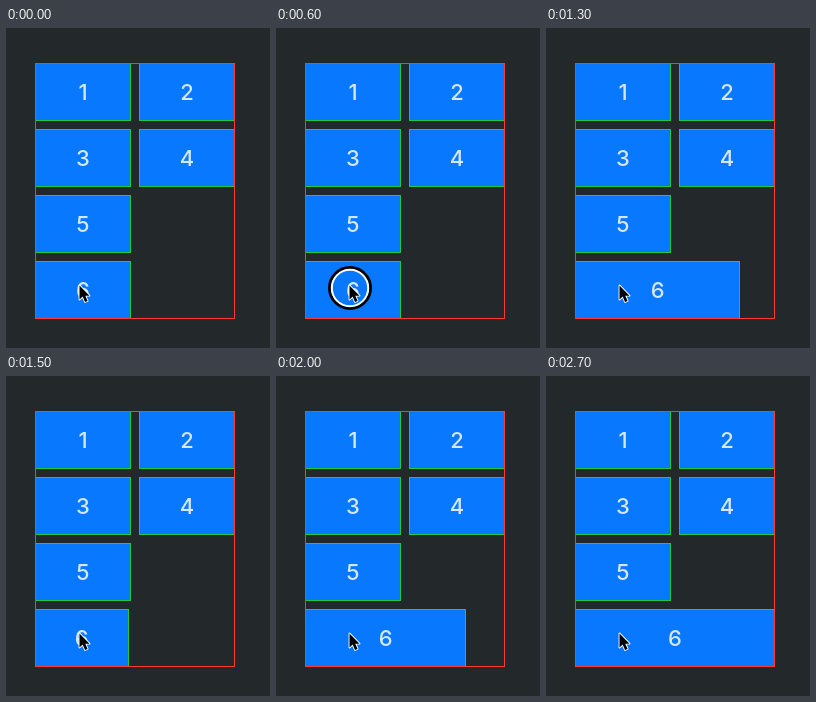
Animation, 264 px wide and 320 px high, one loop 2750 ms. Source, as an HTML page with a canvas:

```html
<!DOCTYPE html>
<html lang="en">
<head>
<meta charset="utf-8">
<title>Grid cell spring</title>
<style>
  html, body { margin: 0; width: 100%; height: 100%; overflow: hidden; background: #23282b; }
  canvas { display: block; }
</style>
</head>
<body>
<canvas id="stage" width="264" height="320"></canvas>
<script>
const ctx = document.getElementById('stage').getContext('2d');
const LOOP = 2750, STEP = 50;
const LEFT = 29, TOP = 35, CELL_W = 96, CELL_H = 58, GAP = 8, FULL_W = 200, FULL_H = 256;
const toggles = [630, 1216, 1862];
const pointer = { x: 73, y: 257 };

// Underdamped spring response from 0 to 1, time in ms
function spring(ms) {
  if (ms <= 0) return 0;
  const t = ms / 1000, damping = 0.7, omega = 2 * Math.PI / 0.5;
  const root = Math.sqrt(1 - damping * damping), phase = omega * root * t;
  return 1 - Math.exp(-damping * omega * t) * (Math.cos(phase) + damping / root * Math.sin(phase));
}

function lastCellWidth(t) {
  const progress = toggles.reduce((sum, at, i) => sum + (i % 2 ? -1 : 1) * spring(t - at), 0);
  return CELL_W + (FULL_W - CELL_W) * progress;
}

function outline(x, y, w, h, color) {
  ctx.strokeStyle = color;
  ctx.lineWidth = 1;
  ctx.strokeRect(x + 0.5, y + 0.5, w - 1, h - 1);
}

function drawCell(label, col, row, width = CELL_W) {
  const x = LEFT + col * (CELL_W + GAP), y = TOP + row * (CELL_H + GAP);
  const w = Math.round(width);
  ctx.fillStyle = '#0878ff';
  ctx.fillRect(x, y, w, CELL_H);
  outline(x, y, w, CELL_H, '#20c840');
  ctx.fillStyle = '#d6e7fb';
  ctx.fillText(label, x + width / 2, y + 37);
}

function ring(radius, lineWidth, color) {
  ctx.beginPath();
  ctx.arc(pointer.x + 1, pointer.y + 3, radius, 0, 2 * Math.PI);
  ctx.lineWidth = lineWidth;
  ctx.strokeStyle = color;
  ctx.stroke();
}

function drawCursor() {
  const arrow = new Path2D('M0.5 0.5V14.5L3.7 11.6L6 17L8.6 15.9L6.3 10.7H10.5Z');
  ctx.save();
  ctx.translate(pointer.x, pointer.y);
  ctx.lineJoin = 'round';
  ctx.lineWidth = 1.8;
  ctx.strokeStyle = '#fff';
  ctx.stroke(arrow);
  ctx.fillStyle = '#000';
  ctx.fill(arrow);
  ctx.restore();
}

function draw(t) {
  ctx.fillStyle = '#23282b';
  ctx.fillRect(0, 0, 264, 320);
  ctx.font = '500 22px Inter, sans-serif';
  ctx.textAlign = 'center';
  for (let i = 0; i < 5; i++) drawCell(String(i + 1), i % 2, i >> 1);
  drawCell('6', 0, 3, lastCellWidth(t));
  outline(LEFT, TOP, FULL_W, FULL_H, '#ff3b30');

  const pressed = toggles.some(at => t > at - 142 && t < at - 12);
  if (pressed) {
    ring(20.5, 3, '#000');
    ring(18.2, 2, '#fff');
  }
  drawCursor();
}

function tick() {
  const t = performance.now() % LOOP;
  draw(Math.floor(t / STEP) * STEP);
  requestAnimationFrame(tick);
}
tick();
</script>
</body>
</html>
```
